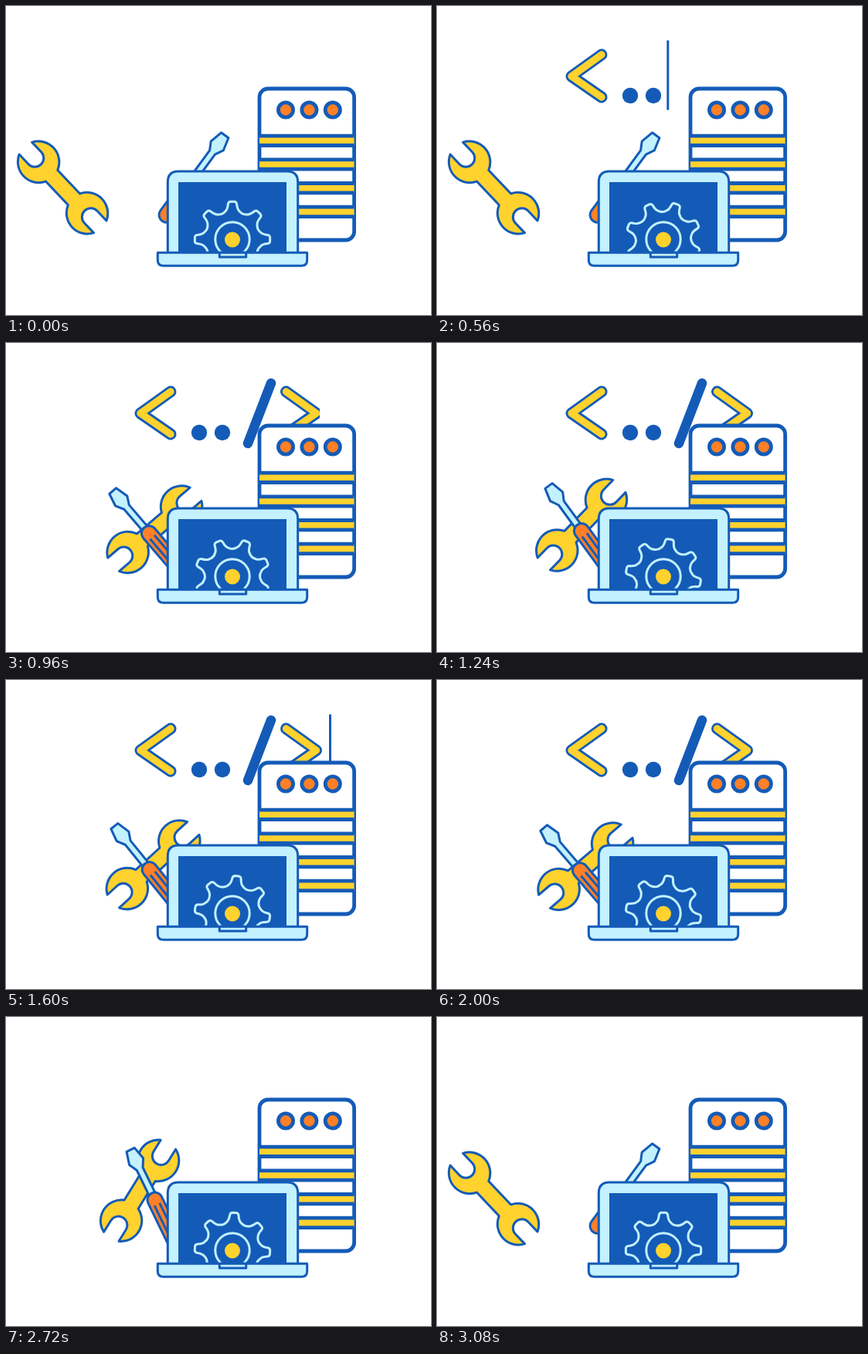
Write an HTML page that moves like this. It is 550 by 400 pixels and loops after 3120 ms.

```html
<!DOCTYPE html>
<html lang="en">
<head>
<meta charset="utf-8">
<title>Tools and code</title>
<style>
  html, body { margin: 0; width: 100%; height: 100%; overflow: hidden; background: #fff; }
  svg { display: block; width: 550px; height: 400px; }
  .line { stroke: #145bb7; stroke-width: 3; stroke-linejoin: round; }
  .blue { fill: #145bb7; }
  .yellow { fill: #ffd22e; }
  .orange { fill: #ff8027; }
  .ice { fill: #c3f1ff; }
  .iceLine { fill: none; stroke: #c3f1ff; stroke-width: 3; stroke-linejoin: round; }
  .pen { fill: none; stroke: #145bb7; stroke-linecap: round; stroke-linejoin: round; }
  .server * { stroke-width: 4.8; }
</style>
</head>
<body>
<svg viewBox="0 0 550 400">
  <defs>
    <clipPath id="typed"><rect id="reveal" y="40" height="100"/></clipPath>
    <clipPath id="screen"><rect x="223" y="228" width="140" height="90"/></clipPath>
    <path id="angle" d="M213 63L174 91L213 118"/>
    <g id="bracket">
      <use href="#angle" class="pen" stroke-width="15"/>
      <use href="#angle" class="pen" style="stroke:#ffd22e" stroke-width="9.4"/>
    </g>
  </defs>

  <g clip-path="url(#typed)">
    <use href="#bracket"/>
    <circle class="blue" cx="250" cy="116" r="10.2"/>
    <circle class="blue" cx="280" cy="116" r="10.2"/>
    <path class="pen" stroke-width="12.5" d="M343 52L313 130"/>
    <use href="#bracket" transform="matrix(-1 0 0 1 575.5 0)"/>
  </g>
  <rect id="cursor" class="blue" x="-1.5" y="44.5" width="3" height="90"/>

  <g id="server" class="server">
    <rect class="line" fill="#fff" x="328" y="107" width="122.6" height="196" rx="11"/>
  </g>

  <g id="wrench">
    <path class="line yellow" transform="translate(82)" d="M-21-10.6H21A27 27 0 0 1 70-11.4H52.6A11.4 11.4 0 0 0 52.6 11.4H70A27 27 0 0 1 21 10.6H-21A27 27 0 0 1-70 11.4H-52.6A11.4 11.4 0 0 0-52.6-11.4H-70A27 27 0 0 1-21-10.6Z"/>
  </g>
  <g id="driver">
    <g transform="translate(0 -15)">
      <path class="line ice" d="M50-4.3H90L100.5-10L117.5-5.7V5.7L100.5 10L90 4.3H50Z"/>
      <rect class="line orange" x="-20" y="-9.7" width="75" height="19.4" rx="9.7"/>
      <path class="line" d="M0-3.7H39M0 3.7H39"/>
    </g>
  </g>

  <path class="line ice" d="M209.3 320V228Q209.3 214 223 214H364Q377.7 214 377.7 228V320Z"/>
  <rect class="blue" x="223" y="228" width="140" height="91"/>
  <g clip-path="url(#screen)">
    <path id="gear" class="iceLine"/>
    <circle class="iceLine" cx="293" cy="302" r="22.2"/>
    <circle class="yellow" cx="293" cy="302.5" r="10"/>
  </g>
  <path class="line ice" d="M196.3 319.3H389.7V329Q389.7 336.3 382 336.3H204Q196.3 336.3 196.3 329Z"/>
  <path class="line ice" d="M276.3 319.3H310.7V325H276.3Z"/>
</svg>
<script>
const $ = id => document.getElementById(id);
const LOOP = 3120, STEP = 40, TURN = 3080;

function addShape(parent, tag, cls, attrs) {
  const el = document.createElementNS('http://www.w3.org/2000/svg', tag);
  el.setAttribute('class', cls);
  for (const key in attrs) el.setAttribute(key, attrs[key]);
  parent.append(el);
}

for (let i = 0; i < 3; i++)
  addShape($('server'), 'circle', 'line orange', { cx: 362 + 30.4 * i, cy: 134.5, r: 9.6 });
for (let i = 0; i < 4; i++) {
  const y = 168.1 + 30.7 * i;
  addShape($('server'), 'path', 'yellow', { d: `M328 ${y}H450.6V${y + 12.4}H328Z` });
  addShape($('server'), 'path', 'line', { d: `M328 ${y}H450.6M328 ${y + 12.4}H450.6` });
}

function gearPath(teeth) {
  const at = (deg, r) => {
    const a = deg * Math.PI / 180;
    return (r * Math.sin(a)).toFixed(2) + ' ' + (-r * Math.cos(a)).toFixed(2);
  };
  let d = 'M' + at(-14, 37.5);
  for (let k = 0; k < teeth; k++) {
    const a = k * 360 / teeth;
    d += `Q${at(a - 9.5, 39)} ${at(a - 7, 46)}Q${at(a - 6, 48.7)} ${at(a - 3, 48.7)}` +
         `L${at(a + 3, 48.7)}Q${at(a + 6, 48.7)} ${at(a + 7, 46)}` +
         `Q${at(a + 9.5, 39)} ${at(a + 14, 37.5)}Q${at(a + 22.5, 34)} ${at(a + 31, 37.5)}`;
  }
  return d + 'Z';
}
$('gear').setAttribute('d', gearPath(8));

const ramp = (t, a, b) => Math.min(1, Math.max(0, (t - a) / (b - a)));
const smooth = (t, a, b) => { const u = ramp(t, a, b); return u * u * (3 - 2 * u); };
const easeOut = (t, a, b) => 1 - (1 - ramp(t, a, b)) ** 2;
const place = (id, x, y, deg) =>
  $(id).setAttribute('transform', `translate(${x} ${y}) rotate(${deg})`);

function draw(t) {
  // Typing edge and blinking cursor
  const edge = 110.5 + 309 * (easeOut(t, 200, 1160) - easeOut(t, 2240, 2680));
  $('reveal').setAttribute('width', edge);
  $('cursor').setAttribute('transform', `translate(${edge})`);
  const lit = t >= 40 && t < 2720 && t % 520 < 200;
  $('cursor').setAttribute('visibility', lit ? 'visible' : 'hidden');

  // Tools swing in, nod once, then swing out
  const nod = smooth(t, 1150, 1400) - smooth(t, 1400, 1650);
  const swing = smooth(t, 560, 960) - 0.195 * nod - smooth(t, 2580, 3080);
  place('wrench', 130, 294.5, -133.5 + 93 * swing);
  place('driver', 226, 271, -53.8 - 76.8 * swing);

  place('gear', 293, 302, 360 * t / TURN);
}

const start = performance.now();
function tick() {
  const t = (performance.now() - start) % LOOP;
  draw(Math.floor(t / STEP) * STEP);
  requestAnimationFrame(tick);
}
tick();
</script>
</body>
</html>
```
